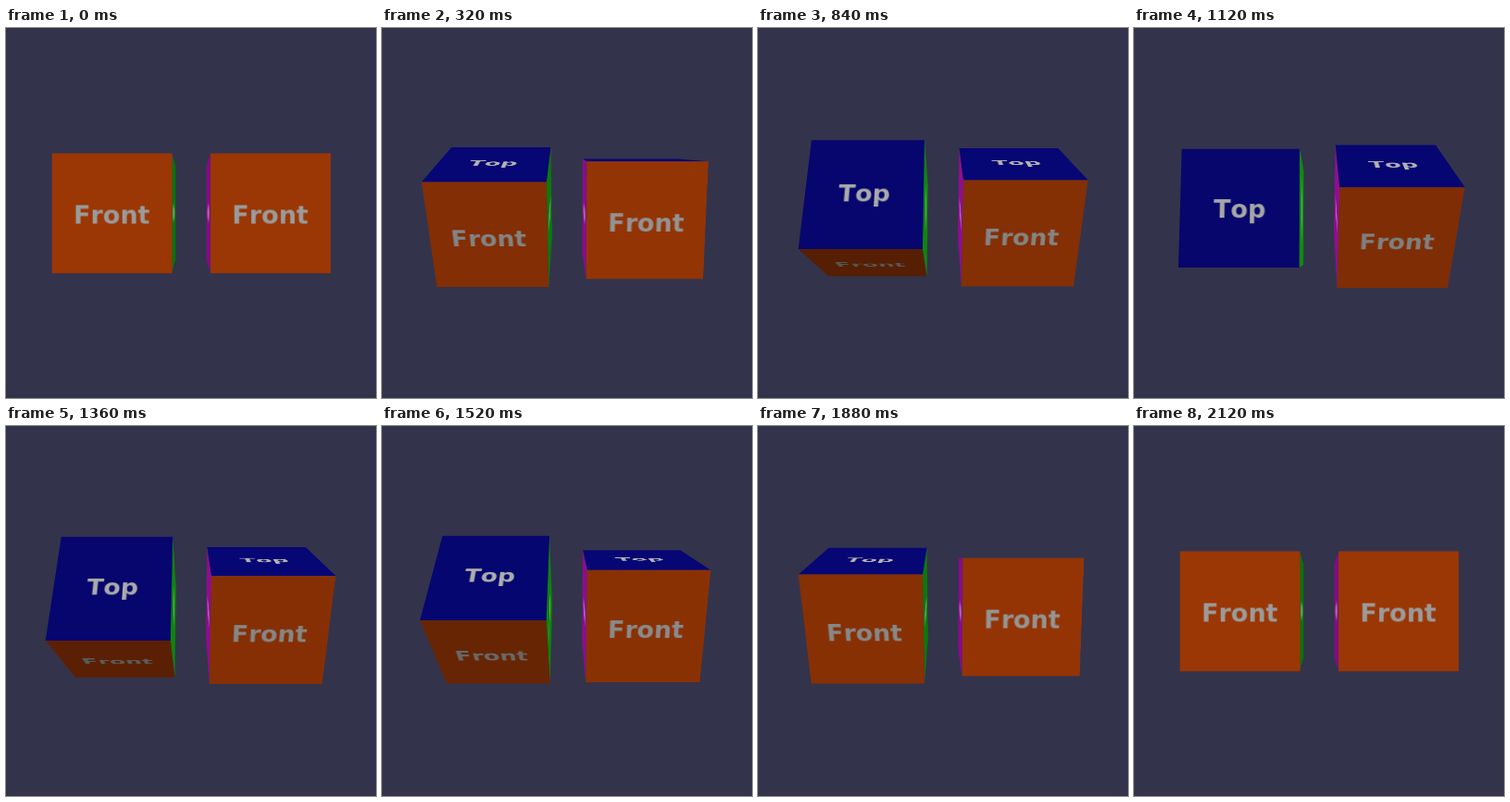
An HTML page that plays this animation: 400x400 px, repeating every 2.16 s.

```html
<!DOCTYPE html>
<html lang="en">
<head>
<meta charset="utf-8">
<title>Two tilting cubes</title>
<style>
  html, body { margin: 0; width: 100%; height: 100%; overflow: hidden; background: #33334c; }
  #stage { position: relative; width: 400px; height: 400px; overflow: hidden; perspective: 475px; }
  .cube {
    position: absolute; top: 136px; width: 128px; height: 128px;
    transform-style: preserve-3d;
  }
  .face {
    position: absolute; inset: 0;
    font: bold 26.8px/132px "DejaVu Sans", sans-serif;
    font-kerning: none;
    text-align: center; backface-visibility: hidden;
  }
  /* Lettering seen edge-on melts into a pale streak */
  .glow { background-image: radial-gradient(46px 13px, rgba(200, 200, 200, .5) 40%, transparent); }
</style>
</head>
<body>
<div id="stage"></div>
<script>
const LOOP = 2160, STEP = 40;
const stage = document.getElementById('stage');

// Tilt of the left cube: [step, degrees], linear in between
const tilt = [[0, 0], [1, 1.2], [8, 24.5], [14, 46.2], [21, 69.2],
              [26.8, 88.8], [34, 64.6], [42, 37.45], [53, 0]];

const sides = [
  { text: 'Front', turn: 'rotateY(0deg)', base: [255, 90, 8], light: a => 0.608 - 0.0039 * a },
  { text: 'Top', turn: 'rotateX(90deg)', base: [9, 9, 165], light: a => 0.72 - 0.0008 * a },
  { turn: 'rotateY(90deg)', base: [20, 190, 16], light: a => 0.6 + 0.0015 * a },
  { turn: 'rotateY(-90deg)', base: [200, 18, 200], light: a => 0.66 + 0.0025 * a }
];

const shade = (rgb, k) => `rgb(${rgb.map(v => Math.round(v * k)).join(',')})`;

function makeCube(centerX, ratio) {
  const box = document.createElement('div');
  box.className = 'cube';
  box.style.left = centerX - 64 + 'px';
  const faces = sides.map(({ text, turn }) => {
    const el = document.createElement('div');
    el.className = text ? 'face' : 'face glow';
    el.textContent = text || '';
    el.style.transform = `${turn} translateZ(64px)`;
    box.append(el);
    return el;
  });
  stage.append(box);
  return { box, faces, ratio };
}

const cubes = [makeCube(115, 1), makeCube(285, 1 / 3)];

function tiltAt(step) {
  const i = Math.max(1, tilt.findIndex(([s]) => s >= step));
  const [s0, a0] = tilt[i - 1], [s1, a1] = tilt[i];
  return a0 + (a1 - a0) * (step - s0) / (s1 - s0);
}

function draw(ms) {
  const angle = tiltAt(Math.floor((ms % LOOP) / STEP));
  for (const { box, faces, ratio } of cubes) {
    const a = angle * ratio;
    box.style.transform = `translateZ(-60px) rotateX(${-a}deg)`;
    faces.forEach((el, i) => {
      const k = sides[i].light(a);
      el.style.backgroundColor = shade(sides[i].base, k);
      el.style.color = shade([255, 255, 255], k);
    });
  }
}

const start = performance.now();
function tick() {
  draw(performance.now() - start);
  requestAnimationFrame(tick);
}
tick();
</script>
</body>
</html>
```
